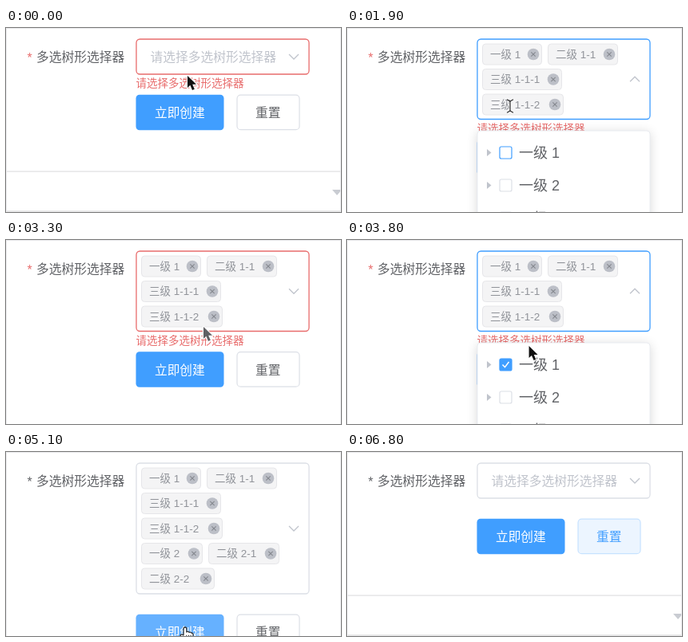
An HTML page with a canvas that plays this animation: 419x231 px, repeating every 7000 ms.

```html
<!DOCTYPE html>
<html lang="zh-CN">
<head>
<meta charset="utf-8">
<style>
  html, body { margin: 0; width: 100%; height: 100%; overflow: hidden; background: #fff; }
  canvas { display: block; width: 419px; height: 231px; }
</style>
</head>
<body>
<canvas></canvas>
<script>
const W = 419, H = 231, LOOP = 7000, STEP = 100;
const canvas = document.querySelector('canvas');
const ctx = canvas.getContext('2d');
const scale = window.devicePixelRatio || 1;
canvas.width = W * scale;
canvas.height = H * scale;

const FONT = '"Liberation Sans", "Noto Sans CJK SC", "Noto Sans CJK", sans-serif';
const BLUE = '#409eff', RED = '#e86c6c', TEXT = '#606266', MUTED = '#909399', PALE = '#c0c4cc', LINE = '#dcdfe6';

// label, left edge, row, width
const TAGS = [
  ['一级 1', 169, 0, 75], ['二级 1-1', 251, 0, 88],
  ['三级 1-1-1', 169, 1, 100], ['三级 1-1-2', 169, 2, 102],
  ['一级 2', 169, 3, 77], ['二级 2-1', 253, 3, 89],
  ['二级 2-2', 169, 4, 92]
];

// time, x, y of the pointer's hot spot
const PATH = [
  [0, 227, 60], [700, 204, 33], [1200, 204, 33], [1600, 202, 94], [1800, 204, 98],
  [2000, 204, 98], [2300, 226, 162], [2800, 226, 162], [3300, 247, 109], [3600, 242, 100],
  [4100, 201, 194], [4600, 201, 194], [5000, 222, 218], [5200, 226, 222],
  [5600, 322, 216], [6400, 322, 216], [6700, 332, 240]
];

const clamp = v => Math.max(0, Math.min(1, v));
const ease = v => v * v * (3 - 2 * v);
const within = (t, a, b) => t >= a && t < b;

function pointerAt(t) {
  const i = PATH.findIndex(p => p[0] > t);
  if (i < 0) return PATH[PATH.length - 1].slice(1);
  const [t0, x0, y0] = PATH[i - 1], [t1, x1, y1] = PATH[i];
  const k = ease((t - t0) / (t1 - t0));
  return [x0 + (x1 - x0) * k, y0 + (y1 - y0) * k];
}

function text(str, x, cy, size, color, weight = 400) {
  ctx.font = `${weight} ${size}px ${FONT}`;
  ctx.fillStyle = color;
  ctx.fillText(str, x, cy + size * 0.37);
}

function box(x, y, w, h, r, fill, stroke, width = 1) {
  ctx.beginPath();
  ctx.roundRect(x, y, w, h, r);
  ctx.fillStyle = fill;
  ctx.fill();
  if (stroke) {
    ctx.strokeStyle = stroke;
    ctx.lineWidth = width;
    ctx.stroke();
  }
}

function polyline(points, color, width) {
  ctx.beginPath();
  points.forEach(([x, y]) => ctx.lineTo(x, y));
  ctx.strokeStyle = color;
  ctx.lineWidth = width;
  ctx.stroke();
}

function polygon(points, color) {
  ctx.beginPath();
  points.forEach(([x, y]) => ctx.lineTo(x, y));
  ctx.closePath();
  ctx.fillStyle = color;
  ctx.fill();
}

function drawTag([label, x, row, w]) {
  const cy = 33 + row * 31.5, cx = x + w - 11;
  box(x + .5, cy - 13, w - 1, 26, 4, '#f4f4f5', '#e6e6e9');
  text(label, x + 10, cy, 13.5, MUTED);
  ctx.beginPath();
  ctx.arc(cx, cy, 7.3, 0, Math.PI * 2);
  ctx.fillStyle = '#bcbfc7';
  ctx.fill();
  polyline([[cx - 2.7, cy - 2.7], [cx + 2.7, cy + 2.7]], '#85888f', 1.1);
  polyline([[cx + 2.7, cy - 2.7], [cx - 2.7, cy + 2.7]], '#85888f', 1.1);
}

function drawSelect(s) {
  box(163, 14, 216, s.bottom - 14, 4.5, '#fff', s.border, 1.3);
  if (s.tags) TAGS.slice(0, s.tags).forEach(drawTag);
  else text('请选择多选树形选择器', 180.5, 36, 15.75, PALE);
  const cy = (s.bottom + 14) / 2, d = 3 * (1 - 2 * s.open);
  polyline([[354, cy - d], [360, cy + d], [366, cy - d]], PALE, 1.3);
}

function drawButtons(top, hoverCreate, hoverReset) {
  box(162.5, top, 110, 44.5, 4.5, hoverCreate ? '#66b1ff' : BLUE);
  text('立即创建', 186, top + 22.5, 15.7, '#fff', 500);
  box(289, top + .5, 78, 43.5, 4.5, hoverReset ? '#ecf5ff' : '#fff', hoverReset ? '#c6e2ff' : LINE, 1.2);
  text('重置', 312, top + 22.5, 15.7, hoverReset ? BLUE : TEXT, 500);
}

function drawPage(shift) {
  ctx.fillStyle = '#e0e0e2';
  ctx.fillRect(0, 179.5 + shift, W, 1.2);
  ctx.fillRect(0, 229.3 + shift, W, 1.5);
  const y = 203 + shift;
  polygon([[408, y], [420, y], [414, y + 7]], '#c9ccd2');
}

function drawMenu(s) {
  if (s.open <= 0) return;
  const top = s.bottom + 14.5;
  ctx.save();
  ctx.globalAlpha = s.open;
  ctx.translate(0, top);
  ctx.scale(1, s.open);
  ctx.shadowColor = 'rgba(0,0,0,.16)';
  ctx.shadowBlur = 14 * scale;
  ctx.shadowOffsetY = 2 * scale;
  box(163, 0, 216, 139, 4, '#fff');
  ctx.shadowColor = 'transparent';
  box(163, 0, 216, 139, 4, '#fff', '#e8ebf0');
  for (let i = 0; i < 3; i++) {
    const cy = 27.5 + i * 41;
    const on = i < s.checked;
    polygon([[175, cy - 4.5], [180.5, cy], [175, cy + 4.5]], PALE);
    box(191, cy - 7.5, 15, 15, 2, on ? BLUE : '#fff', on || i === s.focus ? BLUE : LINE, 1.2);
    if (on) polyline([[194.5, cy], [197.5, cy + 3.2], [202.5, cy - 3.5]], '#fff', 1.5);
    text('一级 ' + (i + 1), 215, cy, 18, TEXT);
  }
  ctx.restore();
}

function drawPointer(kind, x, y, color) {
  ctx.save();
  ctx.translate(x, y);
  ctx.lineJoin = ctx.lineCap = 'round';
  if (kind === 'beam') {
    const stem = [[0, -6], [0, 6]];
    polyline(stem, '#fff', 3);
    polyline(stem, '#333', 1.3);
    for (const side of [-1, 1])
      polyline([[-3.5, 8 * side], [0, 6 * side], [3.5, 8 * side]], '#333', 1.3);
  } else if (kind === 'hand') {
    const outline = new Path2D('M-1.8 1Q0-1 1.8 1V6Q4 4.7 5 6.5Q7 5.5 8 7.3Q10 7 10 9V12L7.5 17H-1L-6 10.5Q-5.5 8-2 10Z');
    ctx.fillStyle = '#fff';
    ctx.fill(outline);
    ctx.strokeStyle = '#333';
    ctx.lineWidth = 1.3;
    ctx.stroke(outline);
    for (const dx of [1.8, 4.5, 7]) polyline([[dx, 10], [dx, 14]], '#333', 1);
  } else {
    const arrow = [[0, 0], [0, 15], [3.4, 11.8], [6, 18], [8.8, 16.8], [6.2, 10.8], [11, 10.8]];
    polyline([...arrow, arrow[0]], '#fff', 2.2);
    polygon(arrow, color);
  }
  ctx.restore();
}

function stateAt(t) {
  const tags = t < 1800 ? 0 : t < 4300 ? 4 : t < 6300 ? 7 : 0;
  const bottom = t < 1800 ? 58 : t < 4300 ? 114.5 : t < 6400 ? 178 : 58;
  const fade = (from, to) => clamp((t - from) / 200) * clamp((to - t) / 200);
  const open = Math.max(fade(1100, 2400), fade(3500, 5100));
  const invalid = t < 4300;
  const focused = within(t, 1200, 2300) || within(t, 3600, 5000);
  return {
    tags, bottom, open,
    star: invalid ? RED : TEXT,
    border: focused ? BLUE : invalid ? RED : LINE,
    error: invalid ? 1 : clamp((4600 - t) / 400),
    checked: t < 2000 ? 0 : t < 4500 ? 1 : 2,
    focus: within(t, 1600, 2300) ? 0 : within(t, 4100, 4900) ? 1 : -1,
    hoverCreate: within(t, 2300, 2900) || within(t, 5100, 5400),
    hoverReset: t >= 5600
  };
}

function draw(t) {
  const s = stateAt(t);
  ctx.setTransform(scale, 0, 0, scale, 0, 0);
  ctx.fillStyle = '#fff';
  ctx.fillRect(0, 0, W, H);

  drawPage(s.bottom - 58);
  text('*', 26.5, 37, 16, s.star);
  text('多选树形选择器', 38, 36, 15.75, TEXT);
  drawSelect(s);
  if (s.error > 0) {
    ctx.globalAlpha = s.error;
    text('请选择多选树形选择器', 162.5, s.bottom + 11.5, 13.5, RED);
    ctx.globalAlpha = 1;
  }
  drawButtons(s.bottom + 25.7, s.hoverCreate, s.hoverReset);
  drawMenu(s);

  ctx.strokeStyle = '#e9e9eb';
  ctx.lineWidth = 1;
  ctx.strokeRect(.5, .5, W - 1, H + 2);

  const kind = within(t, 1800, 2100) ? 'beam' : s.hoverReset || s.hoverCreate ? 'hand' : 'arrow';
  const soft = within(t, 700, 1300) || within(t, 3000, 3600);
  drawPointer(kind, ...pointerAt(t), soft ? '#606064' : '#111');
}

function tick() {
  const t = performance.now() % LOOP;
  draw(Math.floor(t / STEP) * STEP);
  requestAnimationFrame(tick);
}
tick();
</script>
</body>
</html>
```
